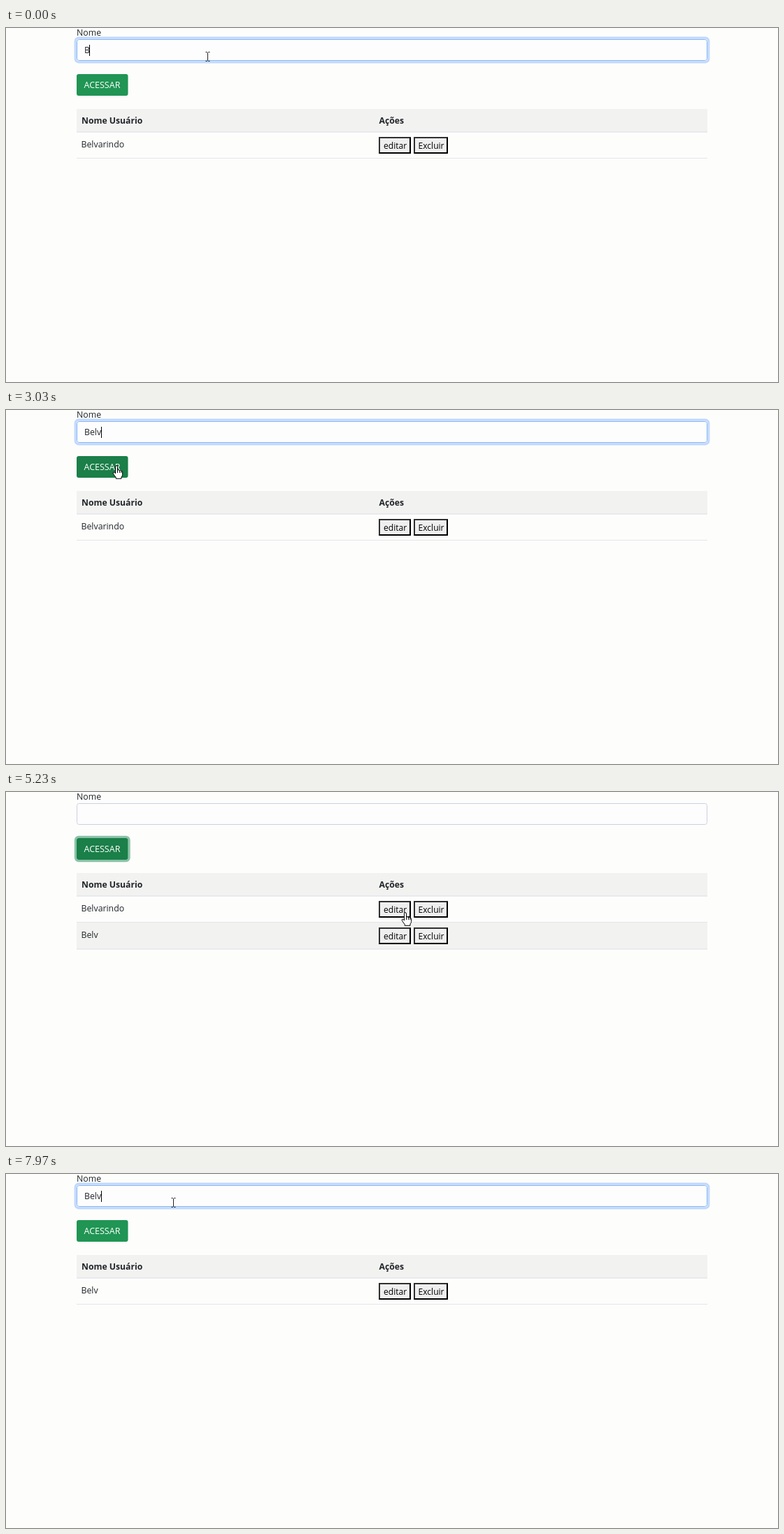
Recreate the animation shown at these times as an HTML page. Size 1104 by 507 pixels, loop 8 s.

```html
<!DOCTYPE html>
<html lang="pt-BR">
<head>
<meta charset="utf-8">
<title>Cadastro de usuários</title>
<style>
  html, body { margin: 0; width: 100%; height: 100%; overflow: hidden; background: #fdfdfc; }
  svg { display: block; width: 1104px; height: 507px; }
  text { font: 12.3px "Open Sans", "Noto Sans", sans-serif; fill: #212529; }
  .head { font-weight: 700; font-size: 12.2px; }
  .action { font-size: 12.1px; fill: #000; }
  .stripe { fill: #f2f2f1; }
  .line { fill: #dbdbe9; }
  .cursor path { fill: #fff; stroke: #000; stroke-width: 1; stroke-linejoin: round; }
</style>
</head>
<body>
<svg viewBox="0 0 1104 507">
  <defs>
    <g id="actions">
      <g id="edit">
        <path d="M533 156H579V180H533Z" fill="#000"/>
        <path d="M533 180V156H579L577 158H535V178Z" fill="#303030"/>
        <path d="M535 158H577V178H535Z" fill="#efefef"/>
        <text class="action" x="540" y="173">editar</text>
      </g>
      <path d="M583 156H632V180H583Z" fill="#000"/>
      <path d="M583 180V156H632L630 158H585V178Z" fill="#303030"/>
      <path d="M585 158H630V178H585Z" fill="#efefef"/>
      <text class="action" x="589.5" y="173">Excluir</text>
    </g>
  </defs>

  <text x="101" y="11">Nome</text>
  <rect id="inputRing" x="99.2" y="14.2" width="905.6" height="34.6" rx="4.5" fill="none" stroke="#0d6efd" stroke-opacity=".25" stroke-width="3.2"/>
  <rect id="input" x="101.5" y="16.5" width="901" height="30" rx="3" fill="#fdfdfd"/>
  <text id="value" x="112" y="36"></text>
  <rect id="caret" y="24" width="1" height="16" fill="#000"/>

  <rect id="submitRing" x="99.4" y="64.4" width="76.7" height="34.2" rx="4.5" fill="none" stroke="#198754" stroke-opacity=".5" stroke-width="3.2"/>
  <rect id="submit" x="101" y="66" width="73.5" height="31" rx="3"/>
  <text x="111.5" y="86" style="fill:#fff;font-size:12.5px">ACESSAR</text>

  <rect class="stripe" x="101" y="116" width="902" height="33"/>
  <rect class="line" x="101" y="148.5" width="902" height="1"/>
  <text class="head" x="108" y="137">Nome Usuário</text>
  <text class="head" x="533.5" y="137">Ações</text>

  <text id="firstName" x="107.5" y="170.5"></text>
  <use href="#actions"/>
  <rect x="101" y="186" width="902" height="1" fill="#e5e5ea"/>
  <g id="secondRow">
    <rect class="stripe" x="101" y="187" width="902" height="37.5"/>
    <rect class="line" x="101" y="224.5" width="902" height="1"/>
    <text x="107.5" y="208.5">Belv</text>
    <use href="#actions" y="38"/>
  </g>

  <g id="pointer" class="cursor">
    <path id="arrow" d="M.5.5V13.8L3.4 11 5.4 15.5 7.4 14.6 5.5 10.3H9.6Z"/>
    <path id="hand" d="M-1.5 11V1.2Q-1.5-.3 0-.3T1.5 1.2V6Q3 5 4.4 6.6 6 5.8 6.8 7.4 8.6 7 8.6 9V12.5Q8.6 14.5 7 16V18.3H-.8V16.5Q-3 14-4.6 11.3-5.3 9.3-3.8 9-2.5 9.2-1.5 11ZM1.5 6V10M4.4 6.6V10M6.8 7.4V10"/>
    <path id="beam" d="M-3-6H-1L0-5 1-6H3M0-5V6M-3 7H-1L0 6 1 7H3" style="fill:none;stroke:#222"/>
  </g>
</svg>
<script>
const DURATION = 8000;
const SUBMIT = 3150, REMOVE = 5900, EDIT = 6820, FOCUS = 7700, HOVER = 2560;
const LAST_KEY = 560;
const FULL_NAME = 'Belvarindo', SHORT_NAME = 'Belv';

// time, x, y of the pointer's hot spot
const route = [
  [0, 288, 40], [1700, 285.5, 40], [2150, 285.5, 40], [2750, 158, 80],
  [3320, 158, 80], [3850, 606, 194], [4300, 346, 138], [4500, 346, 138],
  [5080, 571, 173], [5280, 571, 173], [5600, 609, 172], [6000, 609, 172],
  [6400, 558, 178], [7050, 558, 178], [7650, 239, 40], [8000, 239, 40]
];

const $ = id => document.getElementById(id);
const show = (id, on) => $(id).setAttribute('visibility', on ? 'visible' : 'hidden');
const clamp = v => Math.max(0, Math.min(1, v));
const fade = (t, start) => clamp((t - start) / 150);
const mix = (a, b, k) => `rgb(${a.map((v, i) => Math.round(v + (b[i] - v) * k))})`;
const inside = ([x, y], left, top, right, bottom) => x >= left && x <= right && y >= top && y <= bottom;

function pointerAt(t) {
  const i = route.findIndex(p => p[0] > t);
  const [t0, x0, y0] = route[i - 1], [t1, x1, y1] = route[i];
  const k = (t - t0) / (t1 - t0), e = k * k * (3 - 2 * k);
  return [x0 + (x1 - x0) * e, y0 + (y1 - y0) * e];
}

function inputValue(t) {
  if (t < SUBMIT) return SHORT_NAME.slice(0, 1 + [200, 380, LAST_KEY].filter(key => t >= key).length);
  return t >= EDIT ? SHORT_NAME : '';
}

function caretOn(t) {
  if (t < LAST_KEY) return true;
  const start = t < SUBMIT ? LAST_KEY : FOCUS;
  return (t < SUBMIT || t >= FOCUS) && (t - start) % 1000 < 500;
}

function drawPointer(t, twoRows) {
  const p = pointerAt(t);
  const onAction = top => inside(p, 533, top, 579, top + 24) || inside(p, 583, top, 632, top + 24);
  const hand = inside(p, 101, 66, 174, 97) || onAction(156) || (twoRows && onAction(194));
  const beam = inside(p, 101, 16, 1003, 47);
  $('pointer').setAttribute('transform', `translate(${p.map(Math.round).map(v => v + (beam ? .5 : 0))})`);
  show('hand', hand);
  show('beam', beam);
  show('arrow', !hand && !beam);
}

function draw(t) {
  const twoRows = t >= SUBMIT && t < REMOVE;
  const inputFocus = 1 - fade(t, SUBMIT) + fade(t, FOCUS);
  const submitFocus = fade(t, SUBMIT) - fade(t, REMOVE);
  const submitDark = fade(t, HOVER) - fade(t, REMOVE);

  $('value').textContent = inputValue(t);
  $('caret').setAttribute('x', Math.round(112 + $('value').getComputedTextLength() - .5));
  show('caret', caretOn(t));

  $('input').setAttribute('stroke', mix([206, 207, 226], [134, 183, 240], inputFocus));
  $('inputRing').setAttribute('opacity', inputFocus);
  $('submit').setAttribute('fill', mix([32, 149, 84], [26, 127, 72], submitDark));
  $('submitRing').setAttribute('opacity', submitFocus);

  $('firstName').textContent = t < REMOVE ? FULL_NAME : SHORT_NAME;
  show('secondRow', twoRows);
  drawPointer(t, twoRows);
}

const began = performance.now();
function tick() {
  draw((performance.now() - began) % DURATION);
  requestAnimationFrame(tick);
}
tick();
</script>
</body>
</html>
```
